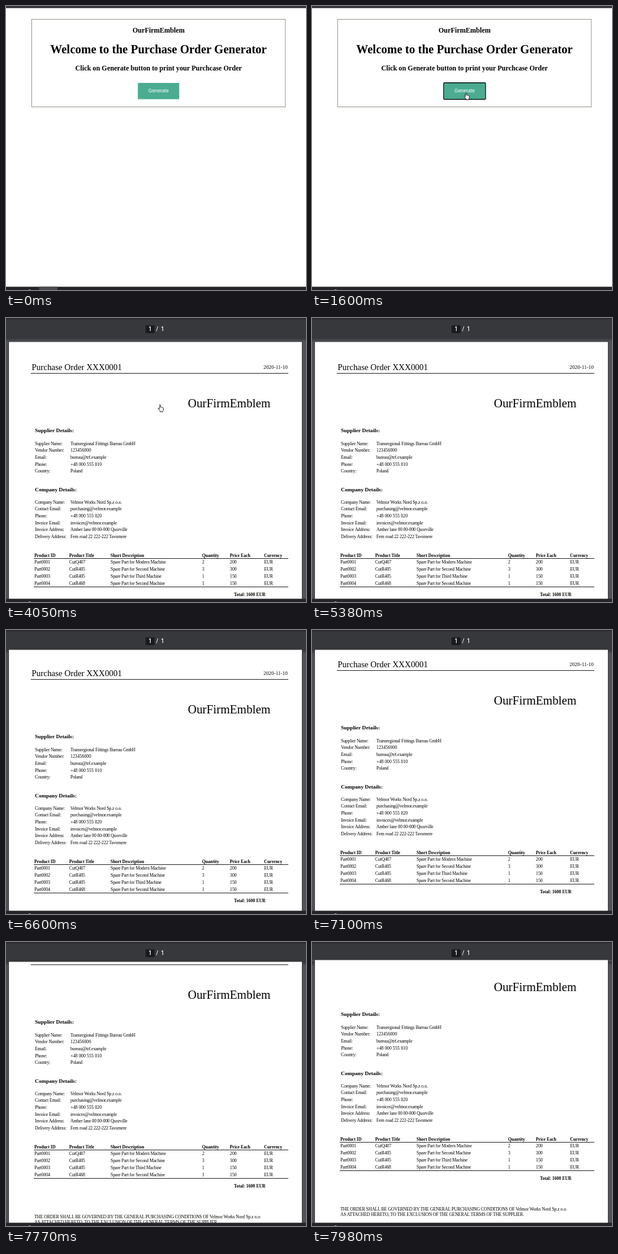
Recreate the animation shown at these times as an HTML page. Size 508 by 480 pixels, loop 8000 ms.

```html
<!DOCTYPE html>
<html lang="en">
<head>
<meta charset="utf-8">
<title>Purchase Order Generator</title>
<style>
  html, body { margin: 0; width: 100%; height: 100%; overflow: hidden; background: #fff; }
  svg { display: block; width: 508px; height: 480px; }
  text { font-family: "Liberation Serif", "Times New Roman", serif; fill: #000; white-space: pre; }
  .bold { font-weight: bold; }
  .mid { text-anchor: middle; }
  .h1 { font-size: 20px; }
  .h3 { font-size: 11.7px; }
  .label { font: 8.33px "Liberation Sans", Arial, sans-serif; fill: #fff; }
  .pager { font: 500 10px Roboto, sans-serif; fill: #f4f4f4; }
  .title { font-size: 14.4px; }
  .date { font-size: 8.85px; }
  .brand { font-size: 20.3px; }
  .head { font-size: 9.2px; font-weight: bold; }
  .cell { font-size: 7.8px; letter-spacing: -.19px; }
  .num { font-size: 7.8px; }
  .th { font-size: 7.5px; font-weight: bold; }

  .home, .viewer, .paper, .ink, .focus, .status, .task, .bar, .cursor, .arrow, .hand {
    animation: 8s step-end infinite;
  }
  .home { animation-name: home; }
  .viewer { animation-name: viewer; }
  .paper { animation-name: paper; }
  .ink { animation-name: ink; }
  .focus { animation-name: focus; }
  .status { animation-name: status; }
  .task { animation-name: task; }
  .bar { animation-name: bar; }
  .cursor { animation-name: seen; }
  .arrow { animation-name: arrow; }
  .hand { animation-name: hand; }
  .move { animation: move 8s linear infinite; }
  .sheet { animation: scroll 8s linear infinite; }

  @keyframes home { 0% { opacity: 1 } 39.125%, 100% { opacity: 0 } }
  @keyframes viewer { 0% { opacity: 0 } 39.125%, 100% { opacity: 1 } }
  @keyframes paper { 0% { opacity: 0 } 39.875%, 100% { opacity: 1 } }
  @keyframes ink { 0% { opacity: 0 } 41%, 100% { opacity: 1 } }
  @keyframes focus { 0% { opacity: 0 } 16%, 100% { opacity: 1 } }
  @keyframes status { 0% { opacity: 0 } 30.875%, 100% { opacity: 1 } }
  @keyframes task { 0% { opacity: 1 } 16%, 100% { opacity: 0 } }
  @keyframes bar { 0% { transform: none } 99.375%, 100% { transform: translateY(-3px) } }
  @keyframes seen { 0% { opacity: 0 } 6.25% { opacity: 1 } 59.75%, 100% { opacity: 0 } }
  @keyframes arrow { 0% { opacity: 1 } 10% { opacity: 0 } 51%, 100% { opacity: 1 } }
  @keyframes hand { 0% { opacity: 0 } 10% { opacity: 1 } 51%, 100% { opacity: 0 } }
  @keyframes move {
    0%, 6.25% { transform: translate(466px, 197px); animation-timing-function: ease-out }
    11.5%, 20% { transform: translate(257px, 146px) }
    20.75% { transform: translate(247px, 134px) }
    21.5% { transform: translate(263px, 140px) }
    22.25%, 55.5% { transform: translate(257px, 146px) }
    56% { transform: translate(246px, 142px); animation-timing-function: ease-in }
    59.75%, 100% { transform: translate(481px, 156px) }
  }
  @keyframes scroll {
    0% { transform: none }
    78.75% { transform: translateY(0); animation-timing-function: steps(10) }
    82.5% { transform: translateY(-10px) }
    84.125% { transform: translateY(-10px); animation-timing-function: steps(33) }
    94.125% { transform: translateY(-43px) }
    94.5% { transform: translateY(-43px); animation-timing-function: steps(25) }
    99.75%, 100% { transform: translateY(-68px) }
  }
</style>
</head>
<body>
<svg viewBox="0 0 508 480">
  <defs>
    <linearGradient id="shade" x2="0" y2="1">
      <stop stop-color="#333437"/>
      <stop offset="1" stop-color="#505257"/>
    </linearGradient>
  </defs>

  <g class="home">
    <rect width="508" height="480" fill="#fff"/>
    <rect width="508" height="3" fill="#36363a"/>
    <rect y="2" width="508" height="1.5" fill="#29282c"/>
    <rect x="43.5" y="22.5" width="429.500" height="148" fill="none" stroke="#98938a"/>
    <text class="h3 bold mid" x="258.300" y="45">OurFirmEmblem</text>
    <text class="h1 bold mid" x="258.300" y="80">Welcome to the Purchase Order Generator</text>
    <text class="h3 bold mid" x="258.300" y="109">Click on Generate button to print your Purchcase Order</text>
    <rect x="223.300" y="130" width="70" height="27.500" fill="#4bac91"/>
    <rect class="focus" x="222.900" y="129.700" width="71" height="28" rx="1.500" fill="none" stroke="#101010" stroke-width="1.400"/>
    <text class="label mid" x="258.300" y="146">Generate</text>
    <path class="status" d="M0 461H95.500q2 0 2 2V475H0z" fill="#68686a"/>
  </g>

  <g class="viewer">
    <rect width="508" height="480" fill="#505257"/>
    <rect y="33" width="508" height="7" fill="url(#shade)"/>
    <g class="sheet">
      <g class="paper">
        <rect x="4" y="39.500" width="498" height="702" fill="#3f4145"/>
        <rect x="5" y="40.500" width="496" height="700" fill="#fff"/>
      </g>
      <g class="ink" id="ink"></g>
    </g>
    <rect class="bar" y="-3" width="508" height="36.500" fill="#37383b"/>
    <rect width="508" height="2" fill="#29282f"/>
    <rect x="236.500" y="12.500" width="15" height="13" fill="#191a1c"/>
    <text class="pager mid" x="244" y="22.300">1</text>
    <text class="pager mid" x="256" y="22.300">/</text>
    <text class="pager mid" x="265" y="22.300">1</text>
  </g>

  <rect y="474.500" width="508" height="6" fill="#25242a"/>
  <rect class="task" x="56" y="474.500" width="31" height="6" fill="#4b4b4f"/>
  <circle cx="40" cy="482" r="2.500" fill="none" stroke="#c4c4c8"/>

  <g class="cursor">
    <g class="move" fill="#fff" stroke="#111" stroke-width=".9" stroke-linejoin="round">
      <path class="arrow" d="M.5.500V11l2.500-2.300 1.700 3.800 1.700-.8-1.700-3.600H8z"/>
      <path class="hand" d="M3 7.500V1.500q0-1 .9-1t.9 1v3.300q1.500-.7 1.700.5 1.500-.6 1.700.5 1.300-.4 1.300.8V9q0 1.500-1 2.300v1.200H4v-1.200L.8 7.500q-.4-1.200.7-1.200z"/>
    </g>
  </g>
</svg>
<script>
  const ink = document.getElementById("ink");

  function add(tag, attrs, body = "") {
    const el = document.createElementNS("http://www.w3.org/2000/svg", tag);
    for (const key in attrs) el.setAttribute(key, attrs[key]);
    el.textContent = body;
    ink.append(el);
  }
  const put = (cls, x, y, body) => add("text", { class: cls, x, y }, body);
  const rule = (x, y) => add("path", { d: `M${x} ${y}H478`, stroke: "#222" });
  const cell = (x, y, body) => put(/^[+\d ]+$/.test(body) ? "num" : "cell", x, y, body);

  function details(name, y, rows) {
    put("head", 49, y, name + " Details:");
    rows.forEach(([key, value], i) => {
      const base = y + 21.3 + i * 11.65;
      cell(49, base, key + ":");
      cell(109, base, value);
    });
  }

  put("title", 43.5, 88, "Purchase Order XXX0001");
  put("date", 436, 86.4, "2020-11-10");
  rule(42, 93.5);
  put("brand", 308, 150.5, "OurFirmEmblem");

  details("Supplier", 193.3, [
    ["Supplier Name", "Transregional Fittings Bureau GmbH"],
    ["Vendor Number", "123456000"],
    ["Email", "bureau@trf.example"],
    ["Phone", "+48 000 555 010"],
    ["Country", "Poland"]
  ]);
  details("Company", 292.5, [
    ["Company Name", "Velmor Works Nord Sp.z o.o."],
    ["Contact Email", "purchasing@velmor.example"],
    ["Phone", "+48 000 555 020"],
    ["Invoice Email", "invoices@velmor.example"],
    ["Invoice Address", "Amber lane 00 00-000 Quorville"],
    ["Delivery Address", "Fern road 22 222-222 Tavomere"]
  ]);

  const cols = [48, 107, 177, 332, 379, 437];
  ["Product ID", "Product Title", "Short Description", "Quantity", "Price Each", "Currency"]
    .forEach((name, i) => put("th", cols[i], 403.6, name));
  rule(47, 406.5);
  [
    ["CutQ407", "Modern", 2, 200],
    ["CutR405", "Second", 3, 300],
    ["CutR405", "Third", 1, 150],
    ["CutR468", "Second", 1, 150]
  ].forEach(([code, kind, count, price], row) => {
    ["Part000" + (row + 1), code, `Spare Part for ${kind} Machine`, count, price, "EUR"]
      .forEach((value, i) => cell(cols[i], 415.4 + row * 11.7, value));
  });
  rule(47, 454.5);
  put("th", 386, 469.6, "Total: 1600 EUR");

  cell(48, 521.6, "THE ORDER SHALL BE GOVERNED BY THE GENERAL PURCHASING CONDITIONS OF Velmor Works Nord Sp.z o.o.");
  cell(48, 531.3, "AS ATTACHED HERETO, TO THE EXCLUSION OF THE GENERAL TERMS OF THE SUPPLIER.");
</script>
</body>
</html>
```
